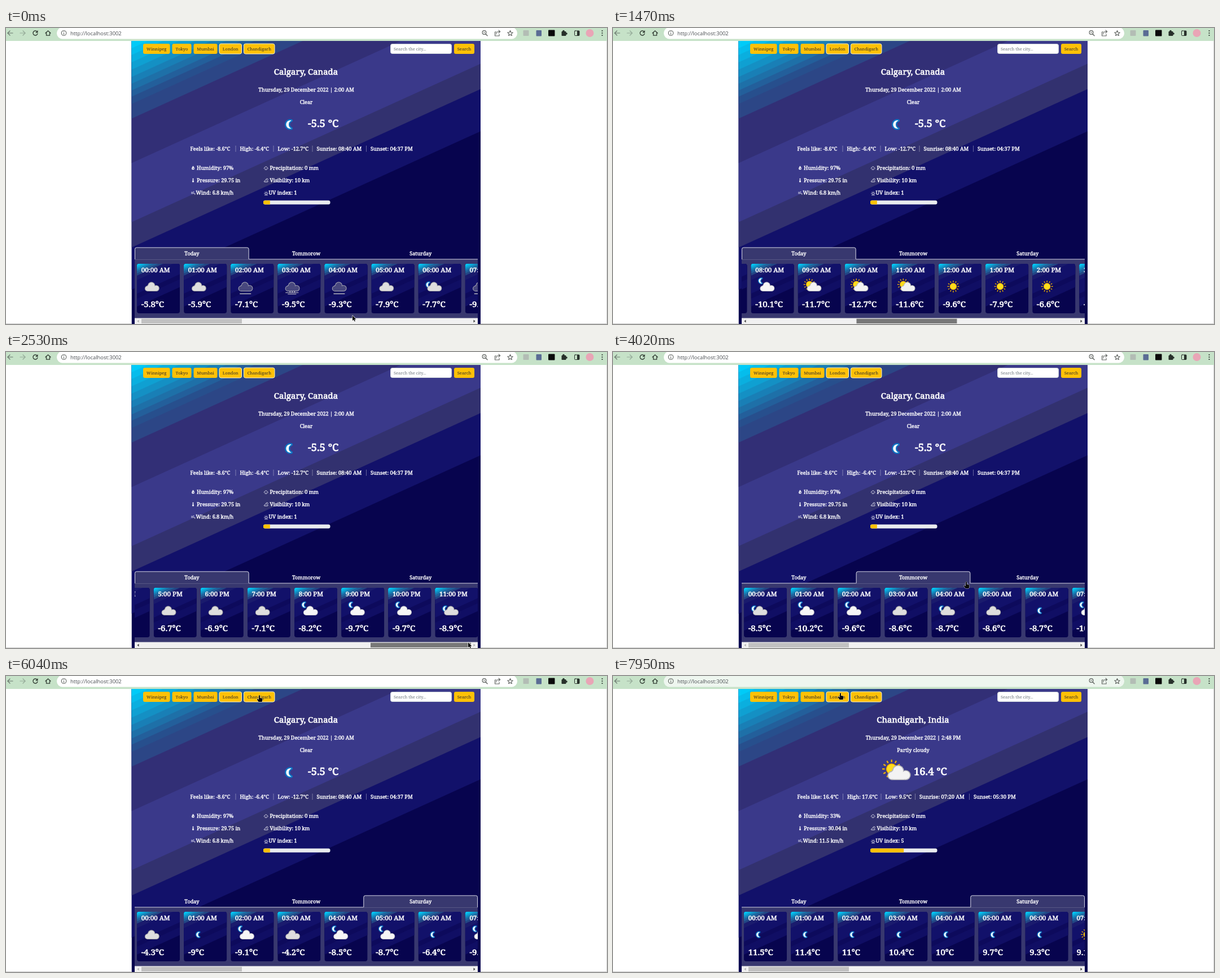
These frames come from a looping animation (1065x526 px, 8 s). An HTML page with a canvas:

```html
<!DOCTYPE html>
<html lang="en">
<head>
<meta charset="utf-8">
<title>Weather</title>
<style>
html, body { margin: 0; width: 100%; height: 100%; overflow: hidden; background: #fff; }
canvas { display: block; }
</style>
</head>
<body>
<canvas id="stage" width="1065" height="526"></canvas>
<script>
const ctx = document.getElementById('stage').getContext('2d');
const SERIF = '"Noto Serif", "DejaVu Serif", serif';
const SANS = '"Open Sans", "Noto Sans", sans-serif';
const LOOP = 8000, TICK = 134.75, SLOPE = 0.455;
const PITCH = 83.1, TRAVEL = 406, MAX_SCROLL = 1383;
const TOMORROW_AT = 26, SATURDAY_AT = 34, CITY_AT = 57;

// Diagonal bands: lower limit measured down the left side, then colour.
const PAGE_BANDS = [
  [36, '#00cbf8'], [48, '#05bdec'], [61, '#0aafdf'], [74, '#0fa0d2'], [87, '#1490c4'],
  [99, '#197fb6'], [111, '#1e70a8'], [122, '#235f9b'], [135, '#274f8d'], [161, '#2c4686'],
  [240, '#322f76'], [345, '#3a398a'], [390, '#32316f'], [465, '#12116a'], [2000, '#07044e']
];
const CARD_BANDS = [
  [4, '#00cbf8'], [7, '#08b2e2'], [10, '#1096c8'], [13, '#187ab0'], [17, '#20609a'],
  [21, '#234684'], [29, '#1a1b6d'], [53, '#12116a'], [62, '#0d0a5c'], [76, '#100e64'], [200, '#07044e']
];

// Icons: c cloud, f fog, z freezing fog, n moon behind cloud, m moon over cloud, p sun and cloud, s sun, o moon.
const DAYS = {
  today: { icons: 'ccfzfcnfmpppsssssccc' + 'mmmn',
    temps: '-5.8 -5.9 -7.1 -9.5 -9.3 -7.9 -7.7 -9.2 -10.1 -11.7 -12.7 -11.6 -9.6 -7.9 -6.6 -6.1 -6.3 -6.7 -6.9 -7.1 -8.2 -9.7 -9.7 -8.9' },
  tomorrow: { icons: 'nmmcncom', temps: '-8.5 -10.2 -9.6 -8.6 -8.7 -8.6 -8.7 -10.1' },
  saturday: { icons: 'comcmmom', temps: '-4.3 -9 -9.1 -4.2 -8.5 -8.7 -6.4 -9.3' },
  india: { icons: 'ooooooos', temps: '11.5 11.4 11 10.4 10 9.7 9.3 9.1' }
};
const CITIES = [
  { name: 'Calgary, Canada', time: '2:00 AM', sky: 'Clear', icon: 'o', temp: '-5.5 °C', tempX: 535,
    stats: ['Feels like: -8.6°C', 'High: -6.4°C', 'Low: -12.7°C', 'Sunrise: 08:40 AM', 'Sunset: 04:37 PM'],
    statX: [326.5, 414.5, 481.5, 550.5, 646],
    humidity: '97%', pressure: '29.75 in', wind: '6.8 km/h', uv: 1 },
  { name: 'Chandigarh, India', time: '2:48 PM', sky: 'Partly cloudy', icon: 'p', temp: '16.4 °C', tempX: 533,
    stats: ['Feels like: 16.4°C', 'High: 17.6°C', 'Low: 9.5°C', 'Sunrise: 07:20 AM', 'Sunset: 05:30 PM'],
    statX: [326.5, 415, 482.5, 543, 639],
    humidity: '33%', pressure: '30.04 in', wind: '11.5 km/h', uv: 5 }
];
// Pointer path: tick, x, y
const PATH = [
  [0, 614, 511], [3, 402, 519], [5, 420, 531], [11, 605, 531], [18, 815, 524], [19, 819, 516],
  [20, 819, 516], [23, 640, 381], [25, 572, 402], [28, 580, 404], [30, 626, 408], [33, 690, 404],
  [36, 698, 404], [37, 690, 390], [40, 418, 99], [41, 430, 76], [43, 449, 34], [46, 449, 34],
  [54, 401, 75], [57, 406, 40], [59, 403, 30]
];

function rect(x, y, w, h, fill, r = 0, stroke) {
  ctx.beginPath();
  ctx.roundRect(x, y, w, h, r);
  if (fill) { ctx.fillStyle = fill; ctx.fill(); }
  if (stroke) { ctx.strokeStyle = stroke; ctx.lineWidth = 1; ctx.stroke(); }
}
function disc(x, y, r, fill) {
  ctx.beginPath();
  ctx.arc(x, y, r, 0, 7);
  ctx.fillStyle = fill;
  ctx.fill();
}
function line(pts, color, width = 1) {
  ctx.beginPath();
  for (let i = 0; i < pts.length; i += 2) ctx.lineTo(pts[i], pts[i + 1]);
  ctx.strokeStyle = color;
  ctx.lineWidth = width;
  ctx.stroke();
}
function arc(x, y, r, from, to, color, width = 1) {
  ctx.beginPath();
  ctx.arc(x, y, r, from, to);
  ctx.strokeStyle = color;
  ctx.lineWidth = width;
  ctx.stroke();
}
function path(d, fill, stroke, width) {
  const p = new Path2D(d);
  if (stroke) { ctx.strokeStyle = stroke; ctx.lineWidth = width; ctx.stroke(p); }
  if (fill) { ctx.fillStyle = fill; ctx.fill(p); }
}
function at(x, y, scale, draw) {
  ctx.save();
  ctx.translate(x, y);
  ctx.scale(scale, scale);
  draw();
  ctx.restore();
}
function text(s, x, y, size, { color = '#fff', align = 'left', font = SERIF, heavy = true } = {}) {
  ctx.font = `${heavy ? 500 : 400} ${size}px ${font}`;
  ctx.textAlign = align;
  ctx.fillStyle = color;
  const base = y + size * 0.36;
  ctx.fillText(s, x, base);
  if (heavy) {
    ctx.lineJoin = 'round';
    ctx.strokeStyle = color;
    ctx.lineWidth = size * 0.045;
    ctx.strokeText(s, x, base);
  }
}
function stripes(x, y, w, h, bands, r) {
  ctx.save();
  ctx.beginPath();
  ctx.roundRect(x, y, w, h, r);
  ctx.clip();
  for (const [c, color] of [...bands].reverse()) {
    ctx.beginPath();
    ctx.moveTo(x, y);
    ctx.lineTo(x, y + c);
    ctx.lineTo(x + c / SLOPE, y);
    ctx.fillStyle = color;
    ctx.fill();
  }
  ctx.restore();
}

function cloud(dx, fill, edge) {
  const body = (grow, color) => {
    disc(dx - 7.6, 3.7, 4 + grow, color);
    disc(dx - 0.8, -1.4, 5.6 + grow, color);
    disc(dx + 7.6, 3.2, 4.6 + grow, color);
    disc(dx - 5, 1, 3 + grow, color);
    rect(dx - 7.6 - grow, 1 - grow, 15 + 2 * grow, 6.8 + 2 * grow, color, 2);
  };
  body(1, edge);
  body(0, fill);
}
function moon(x, y) {
  at(x, y, 1, () => {
    ctx.lineJoin = 'round';
    path('M2.6 -4.4 A4.6 4.6 0 1 0 2.6 4.4 A4.7 4.7 0 0 1 2.6 -4.4 Z', '#fff', '#0d74c4', 2.8);
  });
}
function sun(x, y) {
  for (let i = 0; i < 12; i++) {
    const a = i * Math.PI / 6, c = Math.cos(a), s = Math.sin(a);
    line([x + c * 7.6, y + s * 7.6, x + c * 10.4, y + s * 10.4], '#f5b400', 1.4);
  }
  disc(x, y, 6.2, '#e89c00');
  disc(x, y, 5.4, '#ffdc1c');
}
function weather(kind, x, y, scale = 1) {
  at(x, y, scale, () => {
    if (kind === 'o') moon(-0.5, 0.3);
    if (kind === 's') sun(0, 0);
    if (kind === 'p') { sun(-5.5, -3.6); cloud(2.5, '#f3f3f3', '#b4b4b8'); }
    if (kind === 'm') { moon(-9, -10); cloud(2.5, '#f6f6f6', '#c6c6cc'); }
    if (kind === 'n') { moon(-8.5, -3); cloud(2.5, '#dedede', '#a4a4a8'); }
    if (kind === 'c') cloud(0.5, '#dedede', '#a2a2a4');
    if (kind === 'f' || kind === 'z') {
      cloud(0, '#48487e', '#a9a9b4');
      if (kind === 'f') line([-10, 13, 10, 13], '#b5b5bd', 1.5);
      else {
        line([-12, 11, 11, 11], '#b5b5bd', 1.2);
        line([-8, 13.5, 7, 13.5], '#b5b5bd', 1.2);
        for (const i of [-4, 0, 4]) disc(i, 9.5, 0.9, '#d7d7de');
      }
    }
  });
}

function browser(loading) {
  const ink = '#2f3a31', grey = '#5c605d';
  rect(0, 0, 1065, 23, '#c6e2c8');
  rect(90, -1, 816, 20.5, loading ? '#eef6ef' : '#fff', 10);
  ctx.lineCap = 'round';
  line([12, 9, 3, 9], '#66756a', 1.2);
  line([7, 5, 3, 9, 7, 13], '#66756a', 1.2);
  line([25, 9, 34, 9], '#93a897', 1.2);
  line([30, 5, 34, 9, 30, 13], '#93a897', 1.2);
  arc(52, 9, 4, 0.3, 5.5, ink, 1.4);
  path('M56.5 4 V8.5 H52 Z', ink);
  path('M70 9 L74.5 5 L79 9 M71.5 8 V13.2 H77.5 V8', null, ink, 1.3);
  arc(102.5, 9, 4.3, 0, 7, grey, 1.1);
  line([102.5, 9, 102.5, 11.3], grey, 1.1);
  disc(102.5, 6.9, 0.7, grey);
  text('http://localhost:3002', 114, 9.2, 9.4, { color: '#484c50', font: SANS, heavy: false });

  arc(847.5, 8, 3.4, 0, 7, grey, 1.2);
  line([850, 10.7, 853, 13.7], grey, 1.4);
  line([846, 8, 849, 8], grey, 0.9);
  path('M869 7 H866.5 V14 H874 V11', null, grey, 1.1);
  path('M868.5 11 C869 7 871 6.3 875.5 6.3 M873 4 L875.7 6.3 L873 8.8', null, grey, 1.1);
  ctx.beginPath();
  for (let i = 0; i < 10; i++) {
    const a = i * Math.PI / 5 - Math.PI / 2, r = i % 2 ? 2.2 : 5;
    ctx.lineTo(893.5 + r * Math.cos(a), 9.5 + r * Math.sin(a));
  }
  ctx.closePath();
  ctx.lineWidth = 1.1;
  ctx.strokeStyle = grey;
  ctx.stroke();

  rect(916.5, 4, 10, 10, '#b3bdb5', 1);
  rect(939.5, 4, 9.5, 10.5, '#5a6c94', 1);
  rect(961, 3.5, 11.5, 11, '#0a0a0a', 1);
  rect(984.5, 6, 8, 8, '#27302a', 1);
  disc(988, 5.5, 1.8, '#27302a');
  disc(993, 10, 1.8, '#27302a');
  rect(1007.5, 5, 8.5, 8.5, null, 1, '#27302a');
  rect(1012, 5, 4, 8.5, '#27302a');
  disc(1034.5, 9, 7, '#e9a5b6');
  for (const y of [5, 9, 13]) disc(1056.5, y, 1.1, '#27302a');
  ctx.lineCap = 'butt';
}

function button(label, x, w, outlined) {
  rect(x, 28, w, 18, '#ffc107', 3);
  if (outlined) rect(x, 28, w, 18, null, 3, '#fff0c0');
  text(label, x + w / 2, 37, 7.6, { color: '#2a2a2e', align: 'center', heavy: false });
}

function smallIcons() {
  const w = '#e8e8f2';
  path('M331.5 245 C335 248.5 334.5 252 331.5 252 C328 252 328.5 248.5 331.5 245 Z', w);
  disc(332, 249.6, 0.8, '#3a398a');
  line([331.5, 267, 331.5, 272], w, 1.6);
  disc(331.5, 272.7, 1.6, w);
  path('M328 292 H332 C333 292 333 290.5 332 290.5 M328 294 H334 C335.5 294 335.5 296 334 296', null, w, 0.9);
  path('M458.5 250.5 C456.5 250 457.5 247.5 459 247.8 C459.5 245.5 462.5 246 462.5 248 C464.5 248 464.5 250.5 463 250.5', null, w, 0.9);
  line([460, 250, 459.5, 252.5], w, 0.9);
  line([462, 250, 461.5, 252.5], w, 0.9);
  path('M458 273.5 H463 C465 273.5 464.5 271 462.8 271.3 C462 269 459 269.5 459 271.5 C457 271.5 457 273.5 458 273.5 Z', null, w, 0.9);
  arc(462.5, 269.5, 1.8, 3.3, 6.5, w, 0.9);
  arc(461, 294.2, 1.9, 0, 7, w, 0.9);
  for (let i = 0; i < 5; i++) {
    const a = Math.PI * (1 + i / 4), c = Math.cos(a), s = Math.sin(a);
    line([461 + c * 2.7, 294 + s * 2.7, 461 + c * 3.9, 294 + s * 3.9], w, 0.8);
  }
  line([458, 297, 464, 297], w, 0.8);
}

function summary(city) {
  const mid = { align: 'center' };
  text(city.name, 531.5, 78, 14.9, mid);
  text('Thursday, 29 December 2022 | ' + city.time, 532, 109.3, 9.1, mid);
  text(city.sky, 532, 132, 9.1, mid);
  weather(city.icon, 502.5, 171, 1.6);
  text(city.temp, city.tempX, 169.8, 18.4);
  city.stats.forEach((s, i) => {
    const x = city.statX[i];
    text(s, x, 214.8, 9.3);
    if (i) rect(x - 8, 209, 1, 11, 'rgba(255,255,255,.35)');
  });
  text('Humidity: ' + city.humidity, 338, 248.5, 9.2);
  text('Pressure: ' + city.pressure, 338, 270.5, 9.2);
  text('Wind: ' + city.wind, 336.5, 293, 9.2);
  text('Precipitation: 0 mm', 467.5, 248.5, 9.2);
  text('Visibility: 10 km', 467.5, 270.5, 9.2);
  text('UV index: ' + city.uv, 465.5, 293, 9.2);
  smallIcons();
  ctx.save();
  ctx.beginPath();
  ctx.roundRect(456, 306.5, 118.5, 7, 3);
  ctx.clip();
  rect(456, 306, 119, 8, '#e9ecef');
  rect(456, 306, 11.85 * city.uv, 8, '#ffc107');
  ctx.restore();
}

function tabs(active) {
  const w = 202.67, x = 228 + active * w, edge = '#d5d5e4';
  rect(228, 411, 608, 105, '#38386f');
  line([228, 410.9, 836, 410.9], edge);
  rect(x, 390, w, 21.6, '#38386f', [3, 3, 0, 0]);
  ctx.beginPath();
  ctx.moveTo(x + 0.5, 411);
  ctx.arcTo(x + 0.5, 390.2, x + 5, 390.2, 3);
  ctx.arcTo(x + w - 0.5, 390.2, x + w - 0.5, 411, 3);
  ctx.lineTo(x + w - 0.5, 411);
  ctx.strokeStyle = edge;
  ctx.lineWidth = 1;
  ctx.stroke();
  ['Today', 'Tommorow', 'Saturday'].forEach((s, i) =>
    text(s, 228 + (i + 0.5) * w, 400.5, 9.1, { align: 'center' }));
}

function hourLabel(h) {
  return h < 13 ? String(h).padStart(2, '0') + ':00 AM' : h - 12 + ':00 PM';
}

function cards(day, scroll) {
  const temps = day.temps.split(' ');
  ctx.save();
  ctx.beginPath();
  ctx.rect(228, 411, 608, 105);
  ctx.clip();
  temps.forEach((temp, h) => {
    const x = 232 + h * PITCH - scroll;
    if (x < 140 || x > 840) return;
    stripes(x, 419, 76, 88, CARD_BANDS, 4);
    text(hourLabel(h), x + 7.7, 430.3, 11.5);
    weather(day.icons[h], x + 26, 459.3);
    text(temp + '°C', x + 7.7, 491, 15);
  });
  ctx.restore();
}

function scrollbar(part, held) {
  const dim = '#b0b0b0', dark = '#404040';
  rect(228, 515.5, 608, 10.5, '#f1f1f1');
  rect(240 + part * TRAVEL, 516.8, 178, 8.2, held ? '#787878' : '#c1c1c1');
  path('M235.5 518.5 V523.5 L232.5 521 Z', part > 0 ? dark : dim);
  path('M828.5 518.5 V523.5 L831.5 521 Z', part < 1 ? dark : dim);
}

function pointerAt(k) {
  let i = 1;
  while (i < PATH.length - 1 && PATH[i][0] < k) i++;
  const [k0, x0, y0] = PATH[i - 1], [k1, x1, y1] = PATH[i];
  const p = Math.min(1, (k - k0) / (k1 - k0));
  return [x0 + (x1 - x0) * p, y0 + (y1 - y0) * p];
}
function pointer(x, y) {
  const onTab = y > 390 && y < 411 && x > 228 && x < 836;
  const onButton = y > 28 && y < 46 && x > 243 && x < 476;
  at(x, y, 1, () => {
    ctx.lineJoin = 'round';
    if (onTab || onButton) {
      path('M-1 1 Q0 -1 1 1 V5 L4.5 5.5 Q6 6 5.5 8.5 L4.5 12 H-1.5 L-4 8 Q-4.5 6.5 -3 6.5 L-1 8 Z', '#0b0b0b', '#fff', 0.8);
    } else {
      path('M0 0 V9.2 L2.1 7.2 L3.6 10.4 L5 9.7 L3.6 6.7 H6.5 Z', '#0b0b0b', '#fff', 1.1);
    }
  });
}

function draw(k) {
  const switched = k >= CITY_AT;
  const active = k >= SATURDAY_AT ? 2 : k >= TOMORROW_AT ? 1 : 0;
  const day = switched ? DAYS.india : [DAYS.today, DAYS.tomorrow, DAYS.saturday][active];
  const part = active ? 0 : Math.max(0, Math.min(1, (k - 4.1) * 27.75 / TRAVEL));

  rect(0, 0, 1065, 526, '#fff');
  browser(switched);
  stripes(222.5, 23, 618.5, 503, PAGE_BANDS.map(([c, color]) => [c - 23, color]), 0);
  button('Winnipeg', 243, 47.5);
  button('Tokyo', 294.5, 34);
  button('Mumbai', 332.5, 42);
  button('London', 378, 39.5, true);
  button('Chandigarh', 421.5, 54.5, true);
  rect(681.5, 28.5, 108, 17, '#fff', 3, '#ced4da');
  text('Search the city...', 687, 37, 7.5, { color: '#6c757d', heavy: false });
  button('Search', 794, 36);
  summary(CITIES[+switched]);
  tabs(active);
  cards(day, part * MAX_SCROLL);
  scrollbar(part, k >= 4 && k < 21);
  rect(0, 525, 222, 1, '#c9c9c9');
  rect(841, 525, 224, 1, '#c9c9c9');
  rect(1064, 23, 1, 503, '#d4d4d4');
  pointer(...pointerAt(k));
}

const start = performance.now();
function loop() {
  const t = (performance.now() - start) % LOOP;
  draw(Math.floor((t + 32) / TICK));
  requestAnimationFrame(loop);
}
loop();
</script>
</body>
</html>
```
